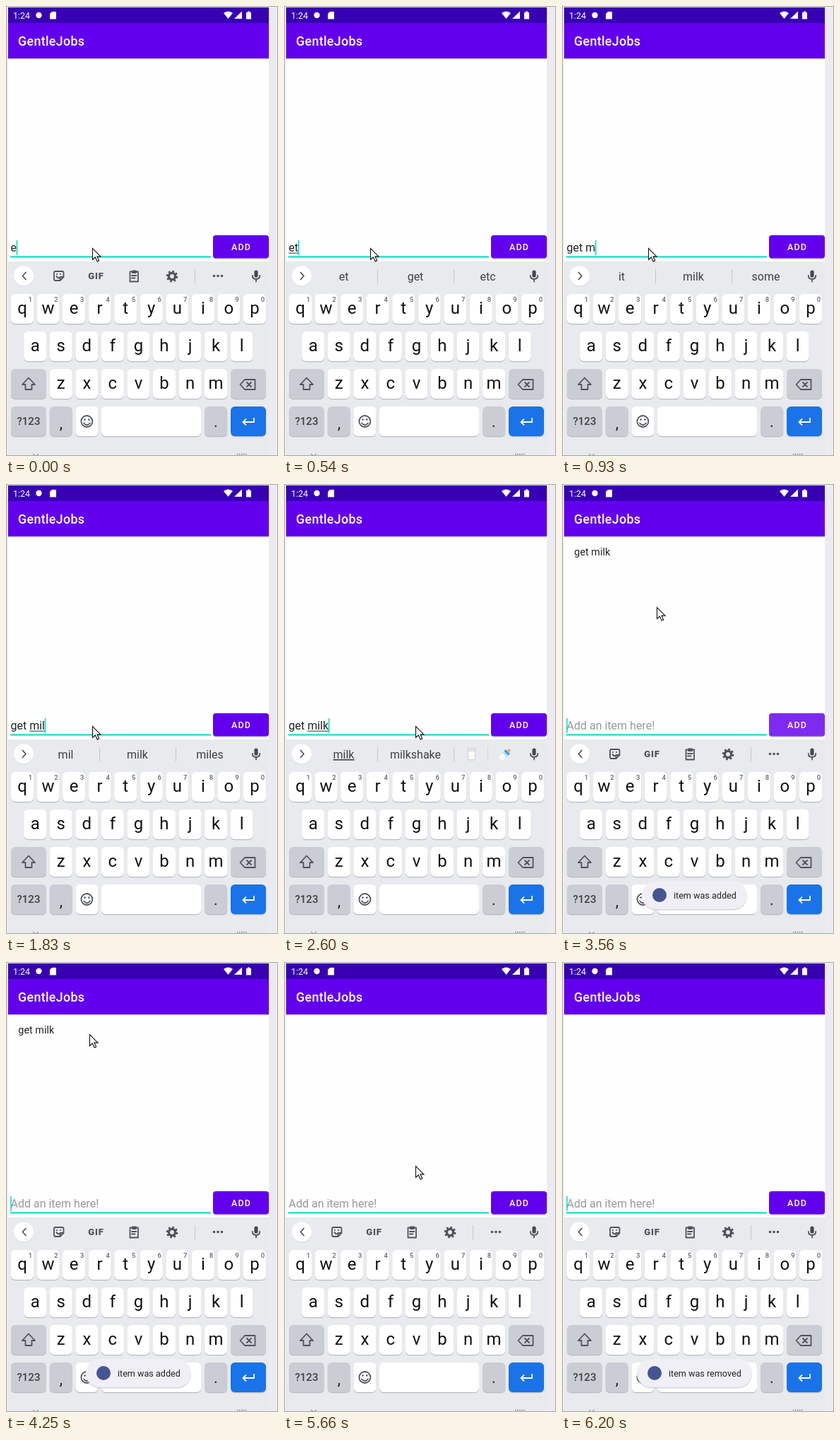
These frames come from a looping animation (385x636 px, 6.35 s). An HTML page:

```html
<!DOCTYPE html>
<html lang="en">
<head>
<meta charset="utf-8">
<title>To-do list</title>
<style>
html, body { margin: 0; width: 100%; height: 100%; overflow: hidden; background: #ebebf0; }
svg { display: block; font-family: Roboto, sans-serif; }
text { white-space: pre; }
.mid { text-anchor: middle; }
.icon { fill: none; stroke: #50545a; stroke-width: 1.8; stroke-linejoin: round; stroke-linecap: round; }
</style>
</head>
<body>
<svg id="stage" width="385" height="636" viewBox="0 0 385 636"></svg>
<script>
const LOOP = 6350;
const PITCH = 36.55;

// Tracks hold [start time, value...]; each value stays until the next one.
const typed = [[0, 'e'], [420, 'et'], [690, 'get'], [810, 'get '], [930, 'get m'],
  [1680, 'get mi'], [1830, 'get mil'], [1950, 'get milk'], [3290, '']];
const composing = [[0, 0, 0], [150, 0, 1], [540, 0, 2], [690, 0, 0], [1240, 4, 5],
  [1830, 4, 7], [2200, 4, 8], [3290, 0, 0]];
const caretOn = [[0, 1], [2750, 0], [3140, 1], [3710, 0], [4250, 1], [4620, 0],
  [5140, 1], [5660, 0], [6200, 1]];
const hints = [[0, ''], [150, 'e,eat,each'], [540, 'et,get,etc'], [690, 'get,the,some'],
  [810, 'it,milk,some'], [1240, 'm,my,message'], [1830, 'mil,milk,miles'],
  [2200, 'milk,milkshake'], [3290, '']];
const pointerAt = [[0, 122, 342], [2600, 186, 342], [2750, 230, 350], [2870, 272, 347],
  [2990, 308, 342], [3140, 326, 339], [3440, 240, 255], [3560, 134, 174], [3710, 98, 117],
  [3860, 73, 106], [3980, 92, 102], [4100, 118, 102], [5390, 160, 210], [5510, 186, 288],
  [5780, 267, 592], [5930, 267, 593], [6050, -50, -50]];
const itemAlpha = [[0, 0], [3290, .35], [3440, .8], [3560, 1], [4870, .9], [5020, .35], [5140, 0]];
const glow = [[0, 0], [3140, .1], [3290, .2], [3560, .17], [3710, .12], [3860, .08],
  [3980, .04], [4100, 0]];
const toastAlpha = [[0, 0], [3290, .3], [3440, .8], [3560, 1], [5390, .5], [5510, 0],
  [5780, .6], [5930, .9], [6050, 1]];

const at = (track, t) => track.findLast(step => step[0] <= t).slice(1);

const rect = (x, y, w, h, fill, r = 0, more = '') =>
  `<rect x="${x}" y="${y}" width="${w}" height="${h}" fill="${fill}" rx="${r}" ${more}/>`;
const circle = (x, y, r, fill, more = '') =>
  `<circle cx="${x}" cy="${y}" r="${r}" fill="${fill}" ${more}/>`;
const label = (x, y, size, fill, str, more = '') =>
  `<text x="${x}" y="${y}" font-size="${size}" fill="${fill}" ${more}>${str}</text>`;
const path = (d, more = 'class="icon"') => `<path d="${d}" ${more}/>`;
const group = (id, body) => `<g id="${id}">${body}</g>`;

const key = (x, y, w, fill) =>
  rect(x, y + 1.2, w, 42, '#b9bcc2', 6) + rect(x, y, w, 42, fill, 6);

function letters(row, x, y) {
  return [...row].map((ch, i) => {
    const kx = x + i * PITCH;
    const digit = row.length > 9
      ? label(kx + 27.5, y + 10.5, 9.5, '#5f6368', (i + 1) % 10, 'class="mid" font-weight="500"') : '';
    return key(kx, y, 32, '#fff') + digit +
      label(kx + 16, y + 28, 24, '#111', ch, 'class="mid"');
  }).join('');
}

function keyboard() {
  const grey = '#cacdd4';
  return rect(3, 361, 369, 274, '#e8eaed') +
    letters('qwertyuiop', 7, 407) + letters('asdfghjkl', 25.2, 460) + letters('zxcvbnm', 61.8, 513) +
    key(7, 513, 50, grey) + key(318, 513, 50, grey) +
    path('M32 525.5 23 535H27.5V542H36.5V535H41Z', 'class="icon" stroke="#333"') +
    path('M338 528H352.5V542H338L331.5 535ZM341 532 347 538M347 532 341 538') +
    key(7, 566, 50, grey) + label(32, 592, 15, '#3c4043', '?123', 'class="mid" font-weight="500"') +
    key(61.8, 566, 32, grey) + label(78, 597, 22, '#222', ',', 'class="mid"') +
    key(98.4, 566, 32, '#fff') + circle(114.4, 587, 8, 'none', 'class="icon"') +
    path('M110 589.5Q114.4 595 119 589.5') +
    circle(111.5, 584.5, 1.3, '#50545a') + circle(117.3, 584.5, 1.3, '#50545a') +
    key(135, 566, 141, '#fff') +
    key(281.2, 566, 32, grey) + label(297, 595, 22, '#222', '.', 'class="mid"') +
    key(318, 566, 50, '#1a73e8') +
    path('M351 582V588H336M340 583.5 335.5 588 340 592.5', 'fill="none" stroke="#fff" stroke-width="1.8"') +
    path('M38 633 42 636 46 633', 'fill="none" stroke="#777"') +
    path('M327 633.5H342', 'stroke="#777" stroke-width="1.5" stroke-dasharray="1.5 1.5"');
}

function toolbar() {
  return path('M28 376.5 23.5 381.5 28 386.5') +
    path('M70 375H79.5Q81.5 375 81.5 377V383L76.5 388H70Q68 388 68 386V377Q68 375 70 375ZM76.5 388V383H81.5M71.5 382Q73 385 75.5 384') +
    circle(72, 379, 1.1, '#50545a') + circle(77, 379, 1.1, '#50545a') +
    label(127.5, 386, 13, '#50545a', 'GIF', 'class="mid" font-weight="900" letter-spacing=".8"') +
    path('M175.5 375.5H187V389.5H175.5ZM179 374.5H184V377H179ZM178 381H184.5M178 384.5H182.5') +
    circle(235, 382, 4.6, 'none', 'stroke="#50545a" stroke-width="3.4"') +
    circle(235, 382, 7, 'none', 'stroke="#50545a" stroke-width="2.6" stroke-dasharray="2.75"') +
    rect(267, 372, 1, 20, '#c3c6ca') +
    [294.5, 300, 305.5].map(x => circle(x, 381.5, 1.8, '#50545a')).join('');
}

function suggestions(list) {
  const words = list.split(',');
  const emoji = words.length < 3;
  const underlined = emoji ? 'text-decoration="underline"' : '';
  return path('M23.5 376.5 28 381.5 23.5 386.5') +
    rect(132, 372, 1, 20, '#c3c6ca') + rect(240, 372, 1, 20, '#c3c6ca') +
    words.map((w, i) => label([84.5, 186, 288.5][i], 388, 16, '#3c4043', w,
      `class="mid" ${i ? '' : underlined}`)).join('') +
    (emoji ? rect(288, 372, 1, 20, '#d3d6da') + milkGlass() + babyBottle() : '');
}

const milkGlass = () =>
  path('M260 374H271L270 390H261Z', 'fill="#dfe5e8" stroke="#c2cbd0" stroke-width=".7"') +
  path('M260.8 378.5H270.2L269.5 389H261.5Z', 'fill="#fffaf0"');

const babyBottle = () => '<g transform="translate(313 382) rotate(45)">' +
  rect(-4, -3, 8, 13, '#b9dcef', 2.5) + rect(-4, 1, 8, 9, '#f8fbfd', 2.5) +
  rect(-4.5, -5.5, 9, 3.5, '#3f9fd8', 1) + rect(-2, -10, 4, 5, '#e8ad72', 2) + '</g>';

const scene =
  rect(0, 0, 385, 636, '#ebebf0') + rect(3, 2, 369, 633, '#fefefe') +
  rect(3, 74, 369, 1, '#c9c7cf') + rect(3, 75, 369, 1, '#e9e8ec') +
  rect(3, 2, 369, 22, '#3700b3') + rect(3, 24, 369, 50, '#6200ee') +
  label(10, 17.7, 12.5, '#fff', '1:24') + circle(46.5, 13, 4.2, '#fff') +
  path('M65 8H71V18.5H62V11Z', 'fill="#fff"') +
  path('M308 10Q314.5 5 321 10L314.5 18ZM334 7.5V18H323ZM340 9H342V7.5H345V9H347V18.5H340Z', 'fill="#fff"') +
  label(17, 56, 17.9, '#fff', 'GentleJobs', 'font-weight="500" letter-spacing=".3"') +
  label(17.3, 101, 14.4, '#222', 'get milk', 'id="item"') +
  rect(6, 353.5, 284, 2, '#03dac5') +
  label(6.5, 347, 16, '#222', '', 'id="field"') +
  label(6.5, 347, 16, '#999', 'Add an item here!', 'id="prompt"') +
  rect(0, 348.7, 0, 1, '#333', 0, 'id="compose"') +
  rect(0, 331, 1.5, 21, '#03dac5', 0, 'id="caret"') +
  rect(293, 325, 79, 33, '#d5d2dc', 4) + rect(293, 324, 79, 32.5, '#6200ee', 4) +
  rect(293, 324, 79, 32.5, '#fff', 4, 'id="glow"') +
  label(333, 345, 12.5, '#fff', 'ADD', 'class="mid" font-weight="500" letter-spacing="1.1"') +
  keyboard() + circle(25, 382.3, 14, '#cfd2d7') + circle(25, 381.5, 14, '#fff') +
  group('tools', toolbar()) + group('words', '') +
  rect(351.4, 373.5, 5.2, 10, '#44484d', 2.6) +
  path('M348.8 381Q348.8 386 354 386T359.2 381M354 386V389.5', 'class="icon"') +
  group('toast', '') +
  path('M0 0V16L3.8 12.5 6.6 18.6 9.2 17.5 6.5 11.6H11.5Z',
    'id="pointer" fill="#fff" stroke="#111" stroke-width="1.1"') +
  rect(.5, .5, 384, 635, 'none', 0, 'stroke="#a5a5aa"');

const toast = (x, w, str) =>
  rect(x, 563, w, 39.5, '#b9b9c3', 20, 'opacity=".6"') + rect(x, 561, w, 40, '#f1eff6', 20) +
  circle(x + 25, 581, 10, '#45558f') + label(x + 45, 585.5, 12.6, '#222', str);

document.getElementById('stage').innerHTML = scene;
const $ = id => document.getElementById(id);
const set = (id, attrs) => {
  for (const name in attrs) $(id).setAttribute(name, attrs[name]);
};

function render(t) {
  const [str] = at(typed, t);
  const field = $('field');
  field.textContent = str;
  const widthOf = n => n ? field.getSubStringLength(0, n) : 0;
  const [from, to] = at(composing, t);
  set('compose', { x: 6.5 + widthOf(from), width: widthOf(to) - widthOf(from) });
  set('caret', { x: 6.3 + widthOf(str.length), opacity: at(caretOn, t)[0] });
  set('prompt', { opacity: str ? 0 : 1 });

  const [list] = at(hints, t);
  set('tools', { opacity: list ? 0 : 1 });
  $('words').innerHTML = list ? suggestions(list) : '';

  set('item', { opacity: at(itemAlpha, t)[0] });
  set('glow', { opacity: at(glow, t)[0] });
  $('toast').innerHTML = t < 5600 ? toast(113, 149, 'item was added') : toast(106, 163, 'item was removed');
  set('toast', { opacity: at(toastAlpha, t)[0] });
  set('pointer', { transform: `translate(${at(pointerAt, t).map(v => v + .5)})` });
}

const start = performance.now();
function frame() {
  render((performance.now() - start) % LOOP);
  requestAnimationFrame(frame);
}
frame();
</script>
</body>
</html>
```
